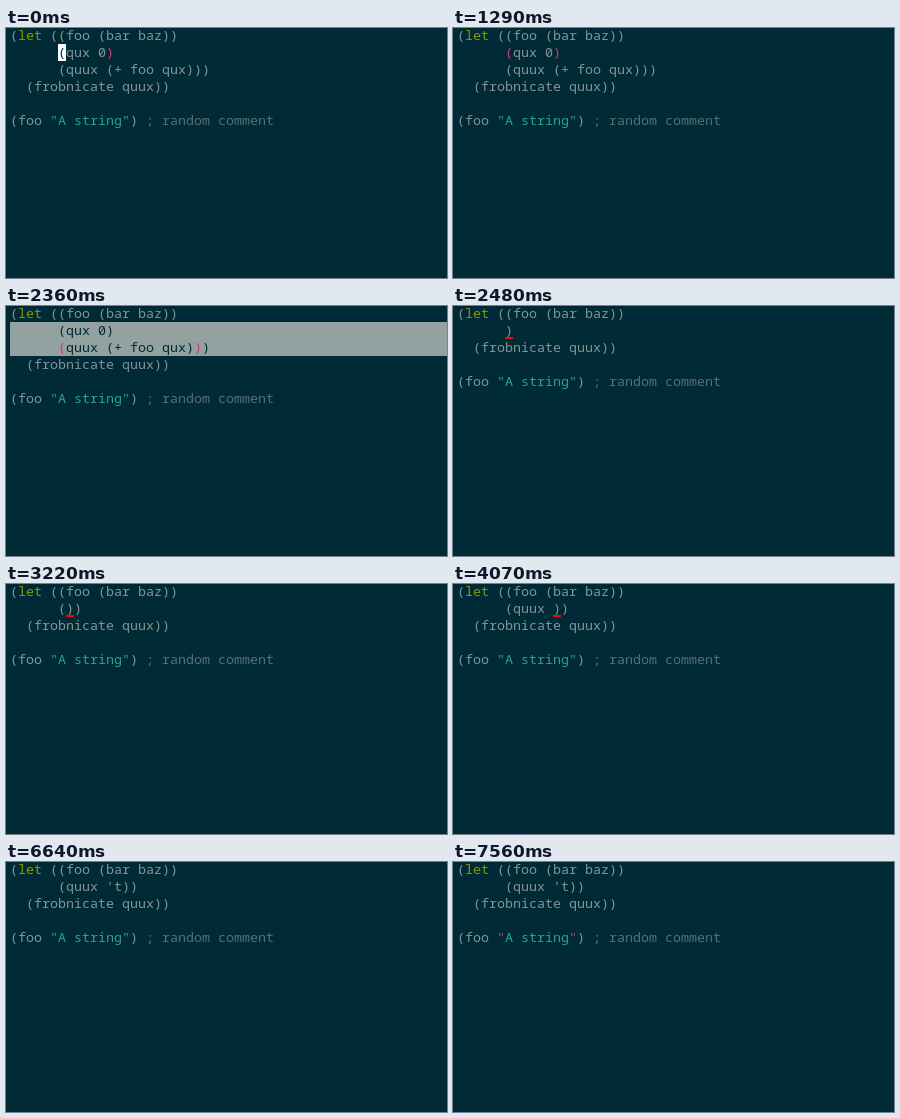
Recreate the animation shown at these times as an HTML page. Size 441 by 250 pixels, loop 7990 ms.

```html
<!DOCTYPE html>
<html lang="en">
<head>
<meta charset="utf-8">
<title>Editing a let form</title>
<style>
  html, body { margin: 0; width: 100%; height: 100%; overflow: hidden; background: #002b36; }
  svg { display: block; width: 441px; height: 250px; }
  text { font: 13.333px "Noto Sans Mono", "DejaVu Sans Mono", monospace; white-space: pre; }
</style>
</head>
<body>
<svg id="stage" viewBox="0 0 441 250"></svg>
<script>
const LOOP = 7990, CELL = 8, LINE = 17, LEFT = 4, TOP = -1, BASE = 13;
const C = {
  bg: '#002b36', fg: '#839496', key: '#859900', str: '#2aa198', note: '#586e75',
  pair: '#d33682', region: '#93a1a1', normal: '#ffffff', visual: '#00ff00', insert: '#ff0000'
};

const head = '(let ((foo (bar baz))';
const tail = ['  (frobnicate quux))', '', '(foo "A string") ; random comment'];
const before = [head, '      (qux 0)', '      (quux (+ foo qux)))', ...tail];
const after = binding => [head, '      ' + binding + ')', ...tail];

// cursor: [kind, row, col]; pairs: [row, col, col]; region: [first row, last row]
const quxPair = [1, 6, 12], quuxPair = [2, 6, 23], quotes = [4, 5, 14];
const block = ['normal', 1, 6];
const typing = (binding, col) => ({ lines: after(binding), cursor: ['insert', 1, col] });
const done = after("(quux 't)");
const doneCursor = ['normal', 1, 14];

const steps = [
  [0, { lines: before, cursor: block, pairs: quxPair }],
  [400, { lines: before, pairs: quxPair }],
  [860, { lines: before, cursor: block, pairs: quxPair }],
  [1290, { lines: before, pairs: quxPair }],
  [1560, { lines: before, cursor: ['visual', 1, 6], pairs: quxPair, region: [1, 1] }],
  [1960, { lines: before, cursor: ['visual', 2, 6], pairs: quxPair, region: [1, 2] }],
  [2090, { lines: before, cursor: ['visual', 2, 6], pairs: quuxPair, region: [1, 2] }],
  [2360, { lines: before, pairs: quuxPair, region: [1, 2] }],
  [2480, typing('', 6)],
  [3070, { lines: after('') }],
  [3220, typing('()', 7)],
  [3650, typing('(qu)', 9)],
  [3800, typing('(quu)', 10)],
  [3930, typing('(quux)', 11)],
  [4070, typing('(quux )', 12)],
  [4470, typing("(quux ')", 13)],
  [4630, typing("(quux 't)", 14)],
  [5090, { lines: done, cursor: doneCursor }],
  [5650, { lines: done }],
  [6060, { lines: done, cursor: doneCursor }],
  [6640, { lines: done }],
  [6790, { lines: done, pairs: quotes }],
  [7090, { lines: done, pairs: quotes, cursor: ['normal', 4, 6] }],
  [7560, { lines: done, pairs: quotes }]
];

const stage = document.getElementById('stage');

function add(tag, attrs, content = '') {
  const el = document.createElementNS('http://www.w3.org/2000/svg', tag);
  for (const name in attrs) el.setAttribute(name, attrs[name]);
  el.textContent = content;
  stage.append(el);
}

const rect = (x, y, width, height, fill) => add('rect', { x, y, width, height, fill });
const xAt = col => LEFT + col * CELL;
const yAt = row => TOP + row * LINE;

function lineColors(line, selected) {
  const colors = Array(line.length).fill(selected ? C.bg : C.fg);
  if (selected) return colors;
  for (const m of line.matchAll(/\blet\b|"[^"]*"|;.*/g)) {
    const color = m[0][0] === '"' ? C.str : m[0][0] === ';' ? C.note : C.key;
    colors.fill(color, m.index, m.index + m[0].length);
  }
  return colors;
}

function drawLine(line, row, colors) {
  for (let from = 0, to; from < line.length; from = to) {
    to = from + 1;
    while (to < line.length && colors[to] === colors[from]) to++;
    const run = line.slice(from, to), start = from + run.search(/\S|$/);
    if (!run.trim()) continue;
    add('text', {
      x: xAt(start), y: yAt(row) + BASE, fill: colors[from],
      'font-weight': colors[from] === C.key ? 700 : 400
    }, run.trim());
  }
}

function render({ lines, cursor, pairs, region }) {
  stage.replaceChildren();
  rect(0, 0, 441, 250, C.bg);
  if (region) {
    const [first, last] = region;
    rect(LEFT, yAt(first), 441 - LEFT, (last - first + 1) * LINE, C.region);
  }
  const [kind, cRow, cCol] = cursor || [];
  if (kind && kind !== 'insert') rect(xAt(cCol), yAt(cRow), CELL, LINE, C[kind]);
  lines.forEach((line, row) => {
    const colors = lineColors(line, region && row >= region[0] && row <= region[1]);
    if (pairs && pairs[0] === row) colors[pairs[1]] = colors[pairs[2]] = C.pair;
    if (row === cRow && kind !== 'insert') colors[cCol] = kind === 'visual' ? C.region : C.bg;
    drawLine(line, row, colors);
  });
  if (kind === 'insert') rect(xAt(cCol), yAt(cRow) + LINE - 2, CELL, 2, C.insert);
}

let shown = -1;
const start = performance.now();

function tick() {
  const t = (performance.now() - start) % LOOP;
  const index = steps.findLastIndex(([at]) => at <= t);
  if (index !== shown) render(steps[shown = index][1]);
  requestAnimationFrame(tick);
}
tick();
</script>
</body>
</html>
```
